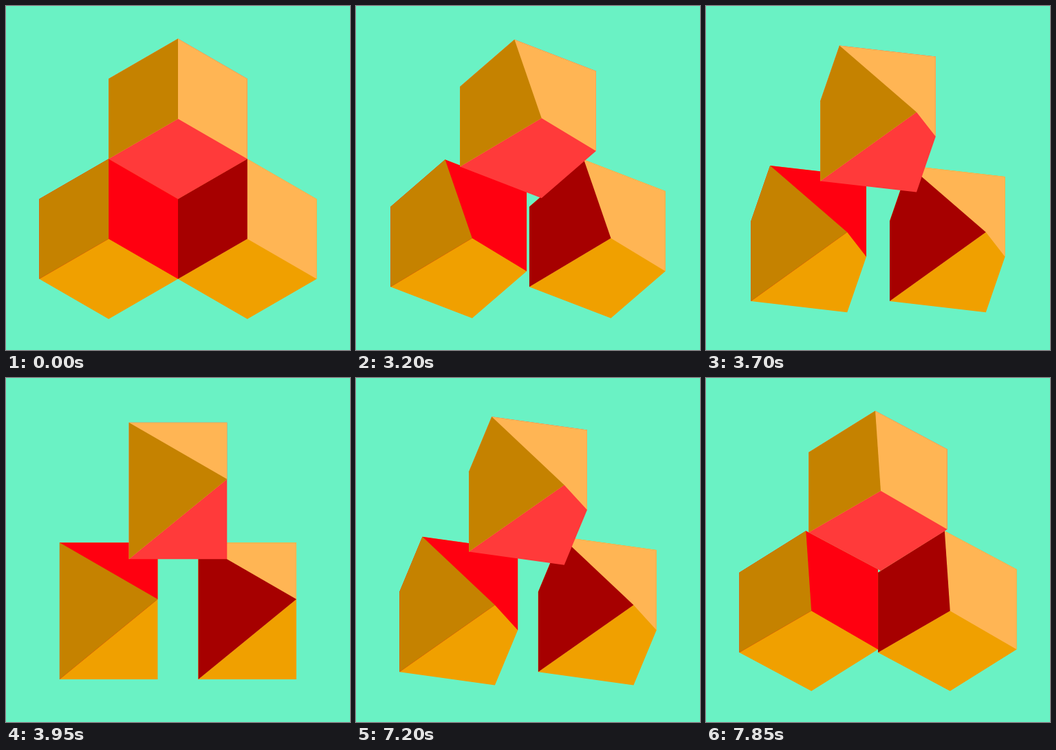
Write an HTML page with a canvas that moves like this. It is 500x500 px and loops after 7.9 s.

```html
<!DOCTYPE html>
<html lang="en">
<head>
<meta charset="utf-8">
<title>Three corners</title>
<style>
  html, body { margin: 0; width: 100%; height: 100%; overflow: hidden; background: #6af2c4; }
  canvas { display: block; width: 100vw; height: 100vh; }
</style>
</head>
<body>
<canvas id="stage" width="500" height="500"></canvas>
<script>
const ctx = document.getElementById('stage').getContext('2d');

const LOOP = 7900, STEP = 50, STEPS = 20;
const TURN_OUT = 3000, TURN_BACK = 6950;

// Isometric cube: half diagonal on screen, its foreshortened depth, its height.
const RADIUS = 100.8;
const DEPTH = RADIUS / Math.sqrt(3);
const HEIGHT = 2 * DEPTH;

const BACKGROUND = '#6af2c4';
const GOLD = '#c58200', LIGHT = '#ffb554', ORANGE = '#f0a000';
const RED = '#ff0010', PALE_RED = '#ff3a3a', DARK_RED = '#a60000';

// Centre of each cube's top face, and its colours; the upper cube is painted last.
const TOP_Y = 164 - DEPTH;
const LOW_Y = TOP_Y + 3 * DEPTH;
const cubes = [
  { x: 250 - RADIUS, y: LOW_Y, left: GOLD, right: RED, floor: ORANGE },
  { x: 250 + RADIUS, y: LOW_Y, left: DARK_RED, right: LIGHT, floor: ORANGE },
  { x: 250, y: TOP_Y, left: GOLD, right: LIGHT, floor: PALE_RED }
];

function fill(color, points) {
  ctx.fillStyle = color;
  ctx.beginPath();
  for (const [x, y] of points) ctx.lineTo(x, y);
  ctx.fill();
}

function drawCube({ x, y, left, right, floor }, angle) {
  const c = Math.cos(angle), s = Math.sin(angle);
  const corner = (dx, dy, drop = 0) => [x + RADIUS * dx, y + DEPTH * dy + drop];
  const back = corner(-s, -c);
  const front = corner(s, c);
  const leftTop = corner(-c, s);
  const rightTop = corner(c, -s);
  const leftLow = corner(-c, s, HEIGHT);
  const rightLow = corner(c, -s, HEIGHT);
  const frontLow = corner(s, c, HEIGHT);

  // Overlapping layers keep the inner edges free of seams.
  fill(floor, [back, rightTop, rightLow, frontLow, leftLow, leftTop]);
  fill(right, [back, rightTop, rightLow, front, leftLow, leftTop]);
  fill(left, [back, front, leftLow, leftTop]);
}

function stepAt(t) {
  if (t < TURN_OUT) return 0;
  if (t < TURN_BACK) return Math.min(STEPS, Math.floor((t - TURN_OUT) / STEP) + 1);
  return STEPS - 1 - Math.floor((t - TURN_BACK) / STEP);
}

function draw(t) {
  const step = stepAt(t);
  const angle = step / STEPS * Math.PI / 4;
  ctx.fillStyle = BACKGROUND;
  ctx.fillRect(0, 0, 500, 500);

  // At rest the cubes touch; a backing closes the joints.
  if (step === 0) {
    fill(RED, [0, 1, 2, 3, 4, 5].map(i => [
      250 + HEIGHT * Math.sin(i * Math.PI / 3),
      LOW_Y - HEIGHT * Math.cos(i * Math.PI / 3)
    ]));
  }
  for (const cube of cubes) drawCube(cube, angle);
}

function tick() {
  draw(performance.now() % LOOP);
  requestAnimationFrame(tick);
}
tick();
</script>
</body>
</html>
```
